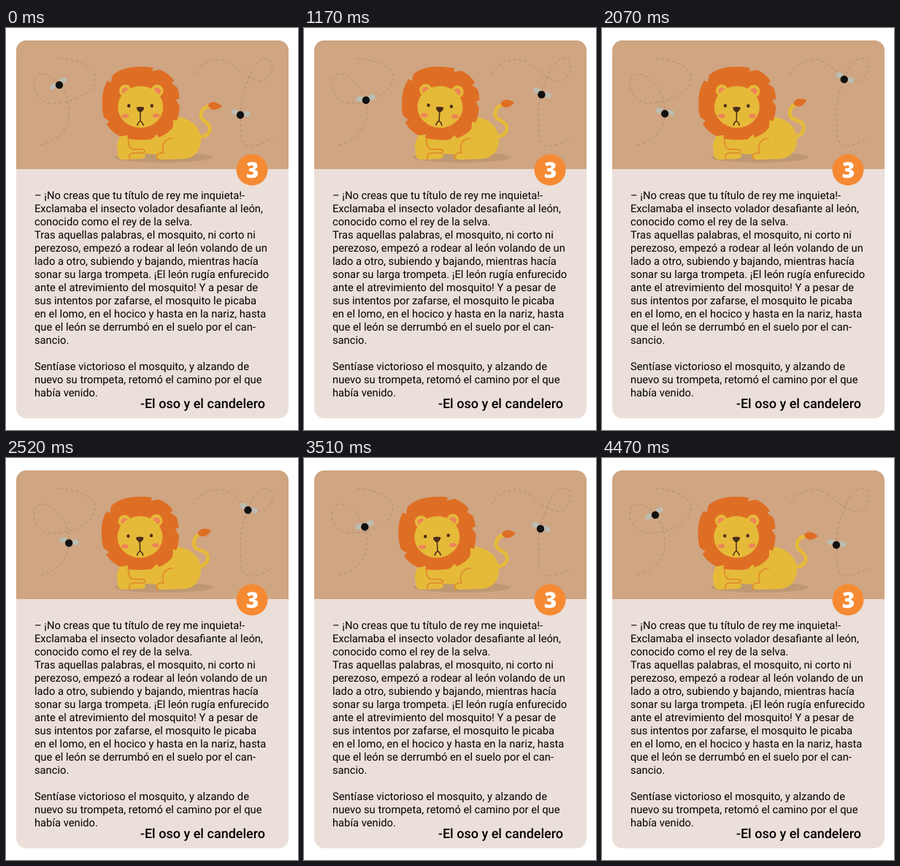
An HTML page with a canvas for the animation above (4.5 s loop, 400 px wide and 550 px high).

```html
<!DOCTYPE html>
<html lang="es">
<head>
<meta charset="utf-8">
<title>Fábula</title>
<style>
html, body { margin: 0; width: 100%; height: 100%; overflow: hidden; background: #fff; }
canvas, svg { position: absolute; left: 0; top: 0; width: 400px; height: 550px; }
text { font-family: Roboto, sans-serif; fill: #000; text-rendering: geometricPrecision; }
.story { font-size: 14.72px; }
.title { font-size: 18px; font-weight: 500; }
.number { font: 800 30px "Open Sans", sans-serif; fill: #fff; text-anchor: middle; }
</style>
</head>
<body>
<canvas width="400" height="550"></canvas>
<svg viewBox="0 0 400 550">
  <g id="story"></g>
  <text class="title" x="184" y="520">-El oso y el candelero</text>
  <text class="number" x="337.5" y="205">3</text>
</svg>
<script>
const LOOP = 4500, STEP = 30;
const BROWN = '#cfa582', CREAM = '#ebdfd9', YELLOW = '#e6ba39', ORANGE = '#df6e25',
      LINE = '#e0912f', PINK = '#ee8558', DARK = '#4b2c1b', TRAIL = '#a78c73';
const ctx = document.querySelector('canvas').getContext('2d');

const lines = `– ¡No creas que tu título de rey me inquieta!-
Exclamaba el insecto volador desafiante al león,
conocido como el rey de la selva.
Tras aquellas palabras, el mosquito, ni corto ni
perezoso, empezó a rodear al león volando de un
lado a otro, subiendo y bajando, mientras hacía
sonar su larga trompeta. ¡El león rugía enfurecido
ante el atrevimiento del mosquito! Y a pesar de
sus intentos por zafarse, el mosquito le picaba
en el lomo, en el hocico y hasta en la nariz, hasta
que el león se derrumbó en el suelo por el can-
sancio.

Sentíase victorioso el mosquito, y alzando de
nuevo su trompeta, retomó el camino por el que
había venido.`.split('\n');

lines.forEach((line, i) => {
  const text = document.createElementNS('http://www.w3.org/2000/svg', 'text');
  text.setAttribute('class', 'story');
  text.setAttribute('x', 39);
  text.setAttribute('y', 234 + i * 18);
  text.textContent = line;
  document.getElementById('story').append(text);
});

function ellipse(x, y, rx, ry, color, angle = 0) {
  ctx.beginPath();
  ctx.ellipse(x, y, rx, ry, angle, 0, 7);
  ctx.fillStyle = color;
  ctx.fill();
}

function fill(d, color) {
  ctx.fillStyle = color;
  ctx.fill(new Path2D(d));
}

function stroke(d, color, width) {
  ctx.strokeStyle = color;
  ctx.lineWidth = width;
  ctx.stroke(new Path2D(d));
}

function rotated(x, y, angle, draw) {
  ctx.save();
  ctx.translate(x, y);
  ctx.rotate(angle);
  ctx.translate(-x, -y);
  draw();
  ctx.restore();
}

function drawCard() {
  ctx.fillStyle = '#fff';
  ctx.fillRect(0, 0, 400, 550);
  ctx.save();
  ctx.beginPath();
  ctx.roundRect(14, 17, 373, 517, 14);
  ctx.clip();
  ctx.fillStyle = CREAM;
  ctx.fillRect(14, 17, 373, 517);
  ctx.fillStyle = BROWN;
  ctx.fillRect(14, 17, 373, 176);
  ctx.restore();
  ellipse(337, 194, 21.5, 21.5, '#f58a33');
}

function drawTrails() {
  ctx.lineCap = 'butt';
  ctx.setLineDash([4, 3.5]);
  stroke('M48 160C72 155 86 136 86 118C87 105 84 91 73 78C63 65 50 58 41 67C34 76 40 102 63 103C91 103 122 88 122 68C121 51 95 43 70 41', TRAIL, 0.9);
  stroke('M257 64C264 50 279 42 293 43C314 45 325 72 350 73C363 71 370 50 361 43C350 37 339 50 332 69.5C326 87 320.5 98 321 119C322 133 319 157 331 161C342 163 356 156 366 150', TRAIL, 0.9);
  ctx.setLineDash([]);
  ctx.lineCap = ctx.lineJoin = 'round';
}

function drawTail(angle) {
  rotated(265, 145, angle, () => {
    stroke('M262 148C274 151 284 141 277 132C272 126 264 124 268 115C270 109 275 107 281 107', YELLOW, 5);
    fill('M277 106C279 100 287 99 296 107C288 114 280 113 277 106Z', ORANGE);
  });
}

function drawBody() {
  fill('M160 140C154 152 150 160 153 168C152 175 154 180 161 180L185 179C191 179 192 175 190 172L206 173C206 178 209 180 215 180L245 179C261 177 268 164 267 151C266 133 249 121 229 121L185 110Z', YELLOW);
  stroke('M168 150C167 160 169 165 175 166L187 166C191 167 191 171 187 171L175 171C170 171 168 174 169 179', LINE, 2);
  stroke('M228 151C217 151 212 161 216 171C207 170 204 176 208 180', LINE, 2);
}

// A squarish round outline, cut by notches that fade out clockwise.
function drawMane() {
  const notches = [-145, -70, -33, -6, 27, 63, 112, 150];
  ctx.beginPath();
  for (let deg = 0; deg < 360; deg++) {
    const c = Math.cos(deg * Math.PI / 180), s = Math.sin(deg * Math.PI / 180);
    const edge = (Math.abs(c / 53) ** 2.4 + Math.abs(s / 50) ** 2.4) ** (-1 / 2.4);
    const past = Math.min(...notches.map(n => (deg - n + 360) % 360));
    const r = edge - 5 * Math.max(0, 1 - past / 10);
    ctx.lineTo(184.7 + r * c, 103 + r * s);
  }
  ctx.closePath();
  ctx.fillStyle = ORANGE;
  ctx.fill();
}

function drawHead(angle) {
  rotated(185, 148, angle, () => {
    drawMane();
    for (const x of [163.5, 207]) {
      ellipse(x, 86, 8.5, 8.5, YELLOW);
      ellipse(x, 86.5, 5, 5, PINK);
    }
    ellipse(184.3, 108, 31, 28.5, YELLOW);
    ellipse(163.5, 120.5, 5, 3, PINK);
    ellipse(205.5, 120, 5, 3, PINK);
    ellipse(168.3, 106.5, 2.2, 2.4, DARK);
    ellipse(199.8, 106.5, 2.2, 2.4, DARK);
    fill('M179 108.5Q184 107 189 108.5Q190 112 184 116Q178 112 179 108.5Z', DARK);
    stroke('M184 114V127M180 133Q180.5 129.5 184 127Q187.5 129.500 188 133', DARK, 1.5);
  });
}

function drawFly([p0, p1, p2, p3], s) {
  const r = 1 - s;
  const [x, y] = [0, 1].map(k =>
    r ** 3 * p0[k] + 3 * r * r * s * p1[k] + 3 * r * s * s * p2[k] + s ** 3 * p3[k]);
  const [dx, dy] = [0, 1].map(k =>
    r * r * (p1[k] - p0[k]) + 2 * r * s * (p2[k] - p1[k]) + s * s * (p3[k] - p2[k]));
  const angle = Math.atan2(dy, dx) - Math.sign(dy) * Math.PI / 2 + 0.12;
  rotated(x, y, angle, () => {
    for (const side of [-1, 1]) ellipse(x + side * 8.2, y - 2.8, 5.3, 3.9, '#bcbcb1', side * 0.12);
    ellipse(x, y, 5.2, 5.2, '#111');
  });
}

const leftFlight = [[73, 78], [85, 93], [87.5, 102], [86, 118]];
const rightFlight = [[321, 119], [322, 97], [327, 87], [332, 69.5]];

function draw(ms) {
  const phase = 2 * Math.PI * ms / LOOP;
  const swing = (1 - Math.cos(phase)) / 2;
  drawCard();
  drawTrails();
  ellipse(216, 177, 67, 7, '#be9873');
  drawTail(-0.363 * swing);
  drawBody();
  drawHead(0.052 * Math.sin(phase));
  drawFly(leftFlight, swing);
  drawFly(rightFlight, swing);
}

const start = performance.now();
function tick() {
  const elapsed = (performance.now() - start) % LOOP;
  draw(Math.floor(elapsed / STEP) * STEP);
  requestAnimationFrame(tick);
}
tick();
</script>
</body>
</html>
```
